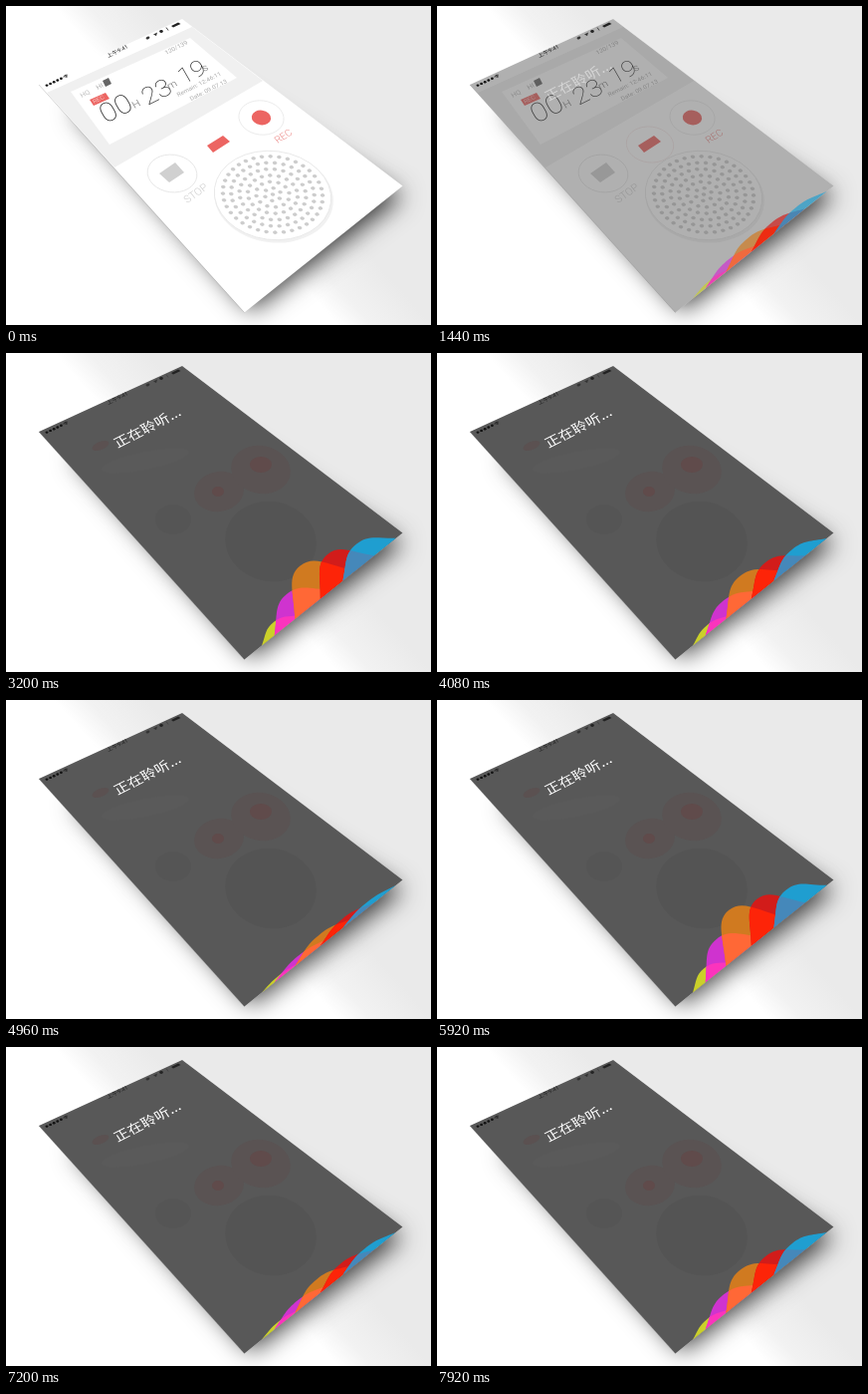
An HTML page with a canvas for the animation above (8000 ms loop, 427 by 320 pixels).

```html
<!DOCTYPE html>
<html lang="zh">
<head>
<meta charset="utf-8">
<title>Voice recorder</title>
<style>
html, body { margin: 0; width: 100%; height: 100%; overflow: hidden; background: #fff; }
canvas { display: block; width: 100vw; height: 100vh; }
</style>
</head>
<body>
<canvas></canvas>
<script>
const W = 427, H = 320, LOOP = 8000, STEP = 80;
const ARMED = 640, LISTEN = 1440;
const canvas = document.querySelector('canvas');
const ctx = canvas.getContext('2d');
const ratio = window.devicePixelRatio || 1;
canvas.width = W * ratio;
canvas.height = H * ratio;

const SANS = 'Roboto, "Noto Sans CJK SC", "Noto Sans CJK", sans-serif';
const SCREEN = [[33, 79], [177, 13], [398.5, 180.5], [239.5, 307.5]];
const RED = '#ec6562';

// Axes of the tilted surface, and of the text lying on it
const ACROSS = [.87, -.5], DOWN = [.72, .7];
const TEXT_ACROSS = [.9, -.45], TEXT_DOWN = [.45, .78];

function poly(points, fill) {
  ctx.beginPath();
  points.forEach(([x, y]) => ctx.lineTo(x, y));
  ctx.closePath();
  ctx.fillStyle = fill;
  ctx.fill();
}

function line(a, b, color, width = 1) {
  ctx.beginPath();
  ctx.moveTo(...a);
  ctx.lineTo(...b);
  ctx.strokeStyle = color;
  ctx.lineWidth = width;
  ctx.stroke();
}

function tilted(x, y, draw, across = ACROSS, down = DOWN) {
  ctx.save();
  ctx.transform(...across, ...down, x, y);
  draw();
  ctx.restore();
}

function disc(x, y, r, fill, stroke) {
  tilted(x, y, () => {
    ctx.beginPath();
    ctx.arc(0, 0, r, 0, 7);
    if (fill) { ctx.fillStyle = fill; ctx.fill(); }
    if (stroke) { ctx.strokeStyle = stroke; ctx.stroke(); }
  });
}

function oval(x, y, rx, ry, fill, turn = 0) {
  ctx.beginPath();
  ctx.ellipse(x, y, rx, ry, turn, 0, 7);
  ctx.fillStyle = fill;
  ctx.fill();
}

function label(str, x, y, size, color, weight = 400, across = TEXT_ACROSS, down = TEXT_DOWN) {
  tilted(x, y, () => {
    ctx.font = `${weight} ${size}px ${SANS}`;
    ctx.fillStyle = color;
    ctx.fillText(str, 0, 0);
  }, across, down);
}

function drawBackdrop() {
  const g = ctx.createLinearGradient(48, 0, 123, -67);
  g.addColorStop(0, '#fff');
  g.addColorStop(.25, '#f2f2f2');
  g.addColorStop(.7, '#eaeaea');
  ctx.fillStyle = g;
  ctx.fillRect(0, 0, W, H);

  ctx.save();
  ctx.shadowColor = 'rgba(0,0,0,.75)';
  ctx.shadowBlur = 25 * ratio;
  ctx.shadowOffsetX = 7 * ratio;
  ctx.shadowOffsetY = 8 * ratio;
  poly([[60, 95], [180, 55], [392, 183], [240, 298]], '#777');
  ctx.restore();
}

function drawDisplay() {
  poly([[41, 87], [187, 21], [258, 75], [109, 162]], '#f0f0f0');
  poly([[65, 86], [185, 32], [232, 72], [104, 139]], '#fff');

  label('HQ', 76, 92, 7, '#bbb');
  label('HI', 92, 84, 7, '#aaa');
  poly([[97, 75], [103, 72], [106, 78], [100, 81]], '#666');
  poly([[84, 94], [100, 87], [104, 93], [88, 100]], RED);
  label('REC', 88.5, 98, 6.5, '#f8c4c2');
  label('120/139', 161, 49, 6.5, '#aaa');

  label('00', 100, 118, 30, '#222', 100);
  label('H', 129, 103, 11, '#777', 300);
  label('23', 142, 100, 27, '#222', 100);
  label('m', 164, 84, 11, '#777', 300);
  label('19', 178, 79, 25, '#222', 100);
  label('s', 199, 66, 11, '#777', 300);
  label('Remain: 12:46:11', 173, 91, 6.3, '#aaa');
  label('Date: 09.07.13', 186, 95, 6.3, '#aaa');
}

function drawSpeaker(x, y) {
  disc(x + 1, y + 2, 53, '#f1f1f1');
  disc(x, y, 52, '#fff', '#e6e6e6');
  disc(x, y - 1, 2, '#cdcdcd');
  for (let ring = 1; ring <= 6; ring++) {
    const count = ring * 6, r = ring * 7.4;
    for (let i = 0; i < count; i++) {
      const a = i / count * Math.PI * 2 + ring * 1.3;
      const u = r * Math.cos(a), v = r * Math.sin(a);
      disc(x + u * ACROSS[0] + v * DOWN[0], y - 1 + u * ACROSS[1] + v * DOWN[1], 2, '#cdcdcd');
    }
  }
}

function drawRecorder(t) {
  poly(SCREEN, '#fff');
  line(SCREEN[0], SCREEN[3], 'rgba(0,0,0,.2)', .8);
  drawDisplay();

  disc(167, 168, 22, '#fff', '#e4e4e4');
  poly([[154, 168], [170, 157], [179, 167], [164, 177]], '#d0d0d0');
  label('STOP', 182, 198, 11, '#ccc', 300, [.8, -.55], [.6, .74]);

  if (t >= ARMED) disc(214, 139, 21, null, '#f4e6e6');
  poly([[202, 140], [218, 130], [225, 136], [208, 147]], RED);

  disc(256.5, 112, 20, '#fff', '#e8e8e8');
  disc(256.5, 112, 8.6, RED);
  label('REC', 273, 138, 10.5, '#eb8a88', 300, [.8, -.5], [.6, .74]);

  drawSpeaker(268, 190);
}

function drawStatusBar() {
  for (let i = 0; i < 5; i++) oval(41 + i * 3.6, 79.6 - i * 1.7, 1.4, 1.2, '#111');
  tilted(61.5, 72, () => {
    ctx.strokeStyle = '#222';
    ctx.lineWidth = .8;
    for (let r = 1; r < 4; r += 1.2) {
      ctx.beginPath();
      ctx.arc(0, 0, r, -2.3, -.85);
      ctx.stroke();
    }
  });
  label('上午9:41', 102.5, 52, 5.8, '#222');
  oval(142.5, 32, 2, 1.3, '#333', -.4);
  poly([[148, 28.5], [152, 26.5], [151, 30]], '#333');
  oval(156, 25.5, 1.8, 1.4, '#222');
  line([161, 21.5], [163, 24.5], '#444');
  poly([[166, 20], [173, 16.5], [175.5, 18], [168, 21.5]], '#222');
}

// Faint remains of the recorder behind the dark sheet
function drawGhosts() {
  oval(168, 167, 18, 15, '#555');
  oval(266, 189, 46, 40, '#545454', .2);
  oval(214, 139, 25, 20, '#5a5353', -.2);
  oval(256, 117, 30, 24, '#5a5353', .2);
  oval(213, 139, 6, 5, '#604b4b');
  oval(256, 112, 11, 8, '#604b4b');
  oval(95, 93, 9, 4, '#5b5151', -.4);
  oval(140, 108, 45, 9, '#5a5a5a', -.2);
}

// Crests are evenly spaced along the bottom edge; mix is the colour over the previous wave
const WAVES = [
  { half: .12, height: 12, color: '#cbd02a' },
  { half: .18, height: 27, color: '#cf33cf', mix: '#fb34bd' },
  { half: .19, height: 42, color: '#d07a20', mix: '#ff6836' },
  { half: .17, height: 33, color: '#d21c1a', mix: '#fd2408' },
  { half: .168, height: 22, color: '#1f9ed0', mix: '#4588ba' }
];

// Voice level: sharp regular pulses above a low murmur
function voiceLevel(t) {
  const pulse = (1 + Math.cos((t - 5920) / 384 * Math.PI * 2)) / 2;
  return .22 + .78 * pulse ** 1.6;
}

function wavePath({ half, height }, i, level) {
  const centre = .23 + .14 * i;
  const x = 239.5 + 159 * centre, y = 307.5 - 127 * centre;
  const wx = 159 * half, wy = -127 * half;
  const ux = -.65 * height * level, uy = -.76 * height * level;
  const at = (along, up) => [x + wx * along + ux * up, y + wy * along + uy * up];
  const path = new Path2D();
  path.moveTo(...at(-1, 0));
  path.bezierCurveTo(...at(-.55, .6), ...at(-.45, 1), ...at(0, 1));
  path.bezierCurveTo(...at(.45, 1), ...at(.55, .6), ...at(1, 0));
  path.closePath();
  return path;
}

function drawWaves(level) {
  const paths = WAVES.map((wave, i) => wavePath(wave, i, level));
  WAVES.forEach(({ color, mix }, i) => {
    ctx.fillStyle = color;
    ctx.fill(paths[i]);
    if (!mix) return;
    ctx.save();
    ctx.clip(paths[i - 1]);
    ctx.fillStyle = mix;
    ctx.fill(paths[i]);
    ctx.restore();
  });
}

function drawListening(t) {
  const shown = 1 - .53 * Math.exp((LISTEN - t) / 70);
  ctx.globalAlpha = shown;
  poly(SCREEN, '#585858');
  ctx.globalAlpha = Math.max(0, shown * 2 - 1);
  drawGhosts();
  ctx.globalAlpha = shown;
  label('正在聆听', 112, 95.5, 14.5, '#fff', 300, [.93, -.475], [.5, .75]);
  for (let i = 0; i < 3; i++) oval(167.5 + i * 3.6, 66 - i * 1.9, 1, .9, '#fff');
  ctx.globalAlpha = .4 + .6 * shown;
  drawWaves(voiceLevel(t));
  ctx.globalAlpha = 1;
}

function render(t) {
  ctx.setTransform(ratio, 0, 0, ratio, 0, 0);
  drawBackdrop();
  drawRecorder(t);
  if (t >= LISTEN) drawListening(t);
  drawStatusBar();
}

const start = performance.now();
function tick() {
  const t = (performance.now() - start) % LOOP;
  render(Math.floor(t / STEP) * STEP);
  requestAnimationFrame(tick);
}
tick();
</script>
</body>
</html>
```
